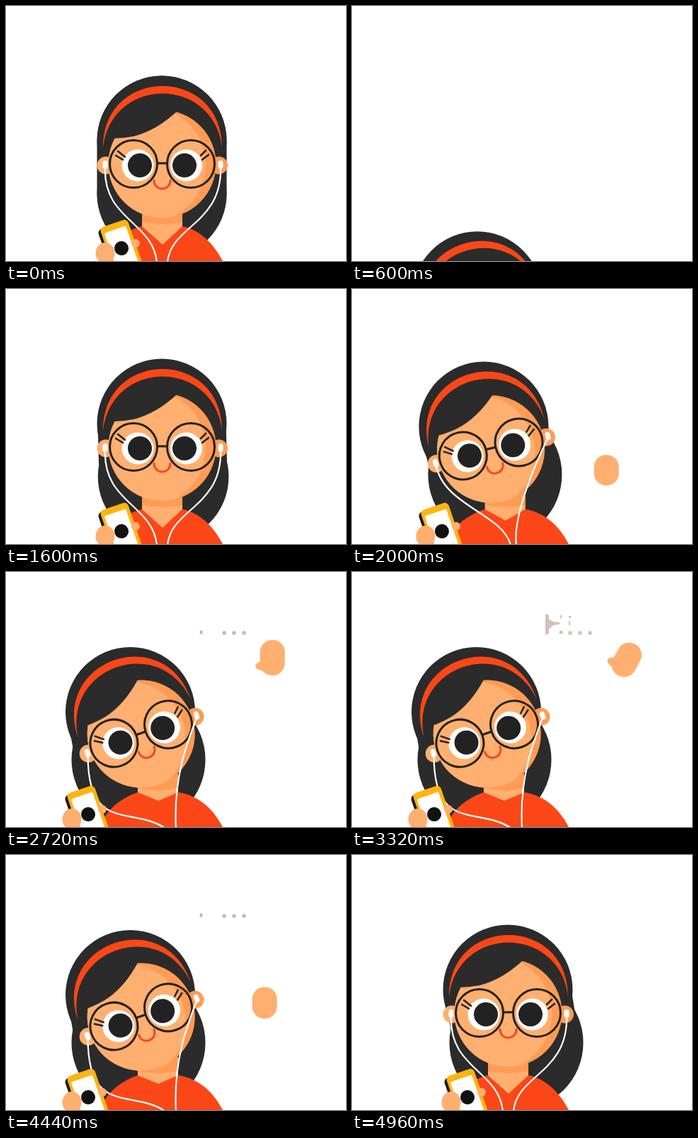
Animation, 480 px wide and 360 px high, one loop 5000 ms. Source, as an HTML page with a canvas:

```html
<!DOCTYPE html>
<html>
<head>
<meta charset="utf-8">
<title>Hello wave</title>
<style>
html, body { margin: 0; width: 100%; height: 100%; overflow: hidden; background: #fff; }
canvas { display: block; }
</style>
</head>
<body>
<canvas id="stage" width="480" height="360"></canvas>
<script>
const ctx = document.getElementById('stage').getContext('2d');
const LOOP = 5000, RAD = Math.PI / 180;
const HAIR = '#2b2b2b', RED = '#fb4718', SKIN = '#ffaf6f', SHADE = '#ff9b54', YELLOW = '#ffb412';

// Earphone wires: left c1, c2, end x, then right c1, c2, end x
const hang = [136, 302, 207, 303, 213, 306, 308, 232, 310, 228];
const flung = [212, 227, 219, 252, 219, 229, 230, 222, 252, 222];
const swing = [128, 305, 215, 318, 224, 262, 240, 226, 320, 232];
const drape = [115, 370, 180, 330, 225, 256, 240, 236, 290, 240];

// head x, y, tilt, face shift, hair end x, y, phone x, y, body drop, glasses lift, glasses tilt, wires
const rest = [220, 190, 0, 0, 220, 265, 163, 342, 0, 0, 0, ...hang];
const hairAt = (pose, x) => pose.map((v, i) => i === 4 ? x : v);
const hidden = rest.map((v, i) => [1, 5, 7, 8].includes(i) ? v + 275 : v);
const peek = [176.5, 411.5, -19, 4, 187, 482, 163, 600, 220, 0, 0, ...hang];
const over = [221, 178, 2, 0, 231, 262, 163, 316, 0, -2, 0, ...flung];
const up = [218.5, 185.5, 0, 2, 210, 267, 162.5, 326.5, 0, -7, 3.5, ...flung];
const tilt = [186, 194, -13.5, 2, 202, 262, 127, 342, 0, 0, 0, ...swing];
const lean = [175.5, 197.5, -19, 4, 187, 265, 116, 342, 0, 0, 0, ...drape];

const easeIn = p => p * p, easeOut = p => 1 - (1 - p) ** 2, easeBoth = p => p * p * (3 - 2 * p);
const hold = () => 0;
const keys = [
  [0, rest], [400, hidden, easeIn], [600, peek, hold], [880, over, easeOut],
  [1120, up, easeBoth], [1280, hairAt(rest, 204), easeBoth], [1480, hairAt(rest, 226), easeBoth],
  [1680, rest, easeBoth], [2000, tilt, easeBoth], [2240, lean, easeOut], [4500, lean, hold],
  [4960, hairAt(rest, 232), easeBoth], [LOOP, rest, hold]
];

function poseAt(t) {
  const i = keys.findIndex(k => k[0] > t);
  const [t0, a] = keys[i - 1], [t1, b, ease] = keys[i];
  const p = ease((t - t0) / (t1 - t0));
  return a.map((v, j) => v + (b[j] - v) * p);
}

function fill(path, color) {
  ctx.fillStyle = color;
  ctx.fill(new Path2D(path));
}
function line(path, color, width) {
  ctx.strokeStyle = color;
  ctx.lineWidth = width;
  ctx.stroke(new Path2D(path));
}
function oval(x, y, rx, color, ry = rx) {
  ctx.fillStyle = color;
  ctx.beginPath();
  ctx.ellipse(x, y, rx, ry, 0, 0, 7);
  ctx.fill();
}
function box(x, y, w, h, r, color) {
  ctx.fillStyle = color;
  ctx.beginPath();
  ctx.roundRect(x, y, w, h, r);
  ctx.fill();
}
// Draws with (ox, oy) moved to (x, y) and turned by deg
function placed(x, y, deg, ox, oy, draw) {
  ctx.save();
  ctx.translate(x, y);
  ctx.rotate(deg * RAD);
  ctx.translate(-ox, -oy);
  draw();
  ctx.restore();
}

function drawHair(x, y, endX, endY) {
  const sway = Math.abs(endX - x);
  oval(x, y, 91.5, HAIR);
  oval(endX, endY, 91.5 + Math.min(3, sway * 0.4), HAIR);
  line(`M${x},${y}L${endX},${endY}`, HAIR, 183 - Math.min(6, sway));
}

function drawBody(drop, leaning) {
  ctx.save();
  ctx.translate(0, drop);
  const n = -6 * leaning, tip = 337 - 14 * leaning;
  fill(`M${192 + n},285H${249 + n}V316L221,340L${192 + n},316Z`, SKIN);
  fill(`M${192 + n},285H${249 + n}V305Q${220 + n},311 ${192 + n},305Z`, SHADE);
  fill(`M132,362C140,335 165,318 ${192 + n},311L${221 + n},${tip}L${249 + n},311C275,316 295,338 307,362Z`, RED);
  ctx.restore();
}

function drawEyes() {
  for (const [white, pupil] of [[186, 189], [254.5, 252]]) {
    oval(white, 225, 22.5, '#fff');
    oval(pupil, 225, 17, '#222');
  }
  line('M155,211L165,217M158,205L168,213M275,211L282,204M277,217L286,210', '#222', 2.5);
}

function drawFace(lift, turn) {
  oval(141, 225, 12.5, SKIN);
  oval(300.5, 225, 12.5, SHADE);
  ctx.save();
  ctx.beginPath();
  ctx.arc(220.5, 223, 76, 0, 7);
  ctx.clip();
  oval(220.5, 223, 77, SHADE);
  oval(200, 224, 82, SKIN);
  ctx.restore();
  fill('M140,187Q160,188 180,184Q212,176 241,149L236,138L160,138L138,170Z', HAIR);
  ctx.save();
  ctx.translate(0, lift * 0.4);
  drawEyes();
  line('M209,246C209,262 232,262 232,246', '#f04a24', 3);
  ctx.restore();
  placed(220.5, 223 + lift, turn, 220.5, 223, () => {
    ctx.strokeStyle = '#222';
    ctx.lineWidth = 3;
    for (const x of [180, 261]) {
      ctx.beginPath();
      ctx.arc(x, 223, 33.5, 0, 7);
      ctx.stroke();
    }
    line('M214,222H227', '#222', 3);
  });
}

function drawWires(x, y, deg, drop, w) {
  const c = Math.cos(deg * RAD), s = Math.sin(deg * RAD);
  [[-80, 36], [83, 36]].forEach(([dx, dy], i) => {
    const [ax, ay, bx, by, end] = w.slice(i * 5, i * 5 + 5);
    line(`M${x + dx * c - dy * s},${y + dx * s + dy * c}C${ax},${ay + drop} ${bx},${by + drop} ${end},${362 + drop}`, '#fff', 2.2);
    placed(x, y, deg, 0, 0, () => box(dx - 3.5, dy - 8, 7, 12, 3.5, '#fff'));
  });
}

function drawPhone(x, y) {
  placed(x, y, -19, 0, 0, () => {
    box(-24, -35, 40, 74, 6, '#1c1c1c');
    box(-20, -37, 41, 75, 6, YELLOW);
    box(-16, -28, 32, 55, 2, '#fff');
    oval(0, 0, 10, '#111');
  });
  oval(x - 23, y + 7, 13.5, SKIN, 15);
  oval(x + 20, y - 7, 6, SKIN);
}

function drawWave(t) {
  if (t < 1840 || t > 4700) return;
  const raised = easeBoth(Math.max(0, Math.min(1, (t - 1840) / 320, (4640 - t) / 320)));
  const deg = t > 2240 && t < 4400 ? 28 * Math.sin((t - 2240) / 480 * 2 * Math.PI) : 0;
  placed(342 + 34 * raised, 411 - 265 * raised, deg * raised, 0, 0, () => {
    const h = 42 + 8 * raised ** 3;
    box(-17.5, -h, 35, h, 17, SKIN);
    if (raised > 0.7) fill('M-14,-24Q-17,-19 -22,-17Q-26,-13 -22,-9Q-15,-6 -8,-5L0,-20Z', SKIN);
  });
}

function drawGreeting(t) {
  if (t < 2160 || t > 4560) return;
  const full = Math.floor(t / 160) % 2 === 0;
  const color = full ? '#d3c1b9' : '#bfbbbb';
  for (const x of [308, 322, 336]) oval(x, 86, 2.8, color);
  if (!full) return oval(275.5, 85, 2, color, 3);
  fill('M273,59L278,61V66Q282,71 293,71V74Q282,74 278,81V87L273,89ZM294,61h2v4h-2ZM306,62h3v3h-3ZM306,69h2v6h-2Z', color);
  oval(295, 85, 2.5, color);
}

function draw(t) {
  const [x, y, deg, shift, endX, endY, phoneX, phoneY, drop, lift, turn, ...wires] = poseAt(t);
  ctx.fillStyle = '#fff';
  ctx.fillRect(0, 0, 480, 360);
  ctx.lineCap = 'round';
  drawHair(x, y, endX, endY);
  drawBody(drop, Math.max(0, -deg / 19));
  placed(x + shift, y, deg, 220, 190, () => drawFace(lift, turn));
  placed(x + shift * 0.4, y, deg, 220, 190, () =>
    fill('M137,200C137,84 305,84 305,200C293,98 149,98 137,200Z', RED));
  drawWires(x + shift, y, deg, drop, wires);
  drawPhone(phoneX, phoneY);
  drawWave(t);
  drawGreeting(t);
}

function tick() {
  draw(performance.now() % LOOP);
  requestAnimationFrame(tick);
}
tick();
</script>
</body>
</html>
```
